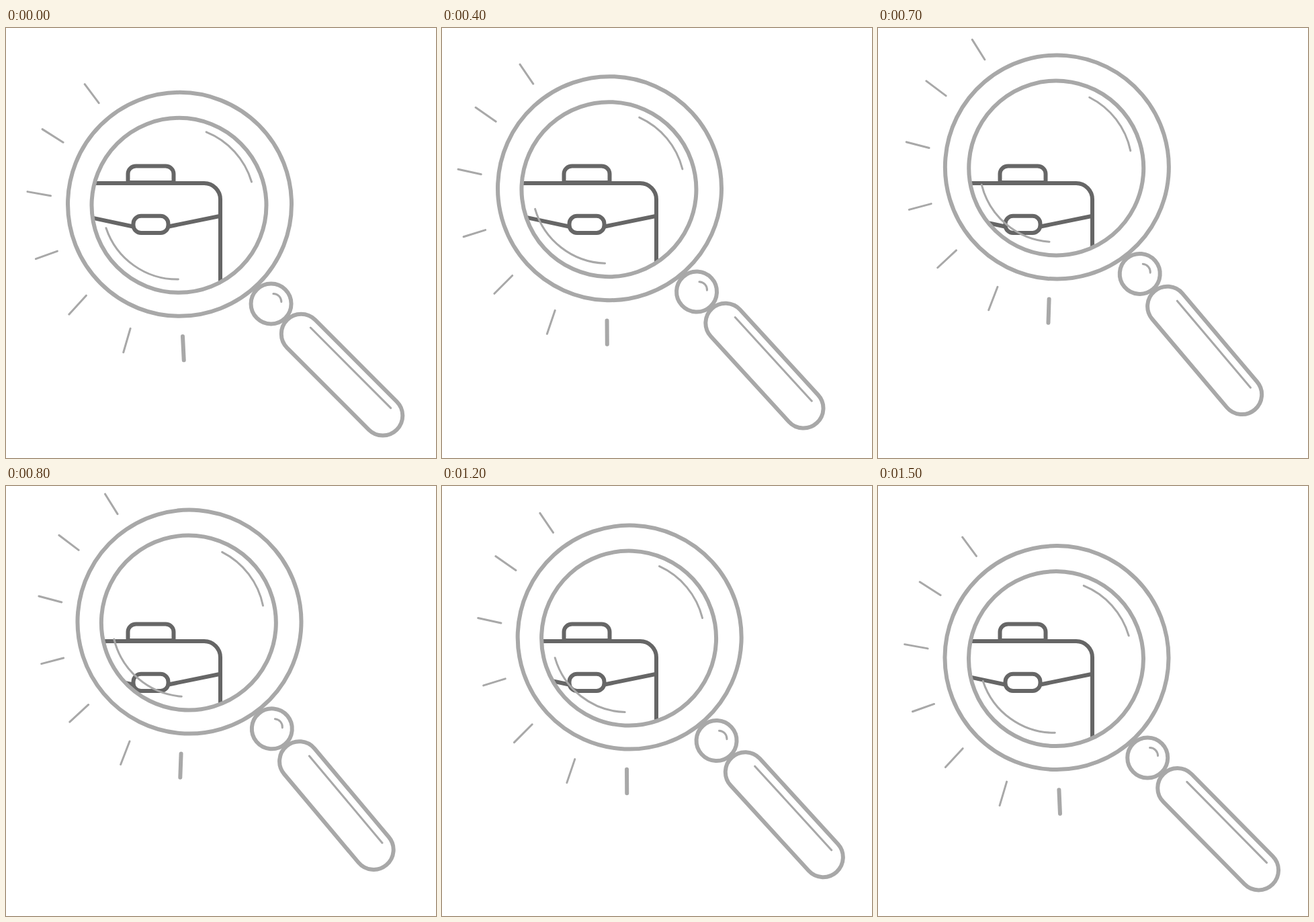
An HTML page for the animation above (1600 ms loop, 640 by 640 pixels).

```html
<!DOCTYPE html>
<html lang="en">
<head>
<meta charset="utf-8">
<title>Search for a job</title>
<style>
  html, body { margin: 0; width: 100%; height: 100%; overflow: hidden; background: #fff; }
  svg { display: block; width: 100vw; height: 100vh; }
  .glass { fill: none; stroke: #a8a8a8; stroke-width: 6; stroke-linecap: round; }
  .thin { stroke-width: 3; }
  .case { fill: none; stroke: #666; stroke-width: 6; }
</style>
</head>
<body>
<svg viewBox="0 0 640 640">
  <defs>
    <clipPath id="lens"><circle id="hole" cx="-1" cy="1.5" r="130"/></clipPath>
  </defs>

  <g class="case" clip-path="url(#lens)">
    <path d="M100 231H295A24 24 0 0 1 319 255V420"/>
    <path d="M181.500 230V217A12 11.500 0 0 1 193.500 205.500H237.500A12 11.500 0 0 1 249.500 217V230Z"/>
    <path d="M100 276.500L189 295.500M242 295.500L319 279.700"/>
    <rect x="189.500" y="279.700" width="52" height="25.300" rx="11.500"/>
  </g>

  <!-- the glass is drawn around the centre of its rim -->
  <g id="glass" class="glass">
    <circle r="166.500"/>
    <circle cx="-1" cy="1.500" r="130"/>
    <g transform="translate(-258.500 -262.500)">
      <circle cx="394.700" cy="410.500" r="30"/>
      <rect x="-29.500" y="-29.500" width="231" height="59" rx="29.500" transform="translate(439.500 455.200) rotate(45)"/>
      <path d="M263.200 459.200L265 494.500"/>
      <g class="thin">
        <path d="M298 155A115 115 0 0 1 365.500 229"/>
        <path d="M149 298A112 112 0 0 0 256.500 374.200"/>
        <path d="M398 395.500A12 12 0 0 1 410 407.500"/>
        <path d="M453.500 446L573 565.500"/>
        <path d="M117 84L138 112M54 151L85 170.500M32 244L66.500 250M44.500 344L76.500 332.500M94 426.500L119.500 398.500M175 483L185.300 447.500"/>
      </g>
    </g>
  </g>
</svg>
<script>
  const LOOP = 1600, STEP = 100;
  const { sin, cos, PI } = Math;
  const parts = ["hole", "glass"].map(id => document.getElementById(id));

  // The glass swings round a slanted oval, tilting as it rises
  function pose(u) {
    const a = 2 * PI * (u - 0.031 * u ** 8); // slows a little at the end
    return {
      x: 265 - 7.25 * cos(a) - 14.75 * sin(a) + 0.75 * cos(2 * a) + 0.3 * sin(2 * a),
      y: 232.2 + 30.15 * cos(a) + 6.5 * sin(a) - 0.3 * sin(2 * a),
      tilt: 2.52 - 2.46 * cos(a)
    };
  }

  function draw(ms) {
    const t = Math.floor((ms % LOOP) / STEP) * STEP;
    const { x, y, tilt } = pose(t / LOOP);
    for (const part of parts) {
      part.setAttribute("transform", `translate(${x} ${y}) rotate(${tilt})`);
    }
  }

  const start = performance.now();
  function tick() {
    draw(performance.now() - start);
    requestAnimationFrame(tick);
  }
  tick();
</script>
</body>
</html>
```
